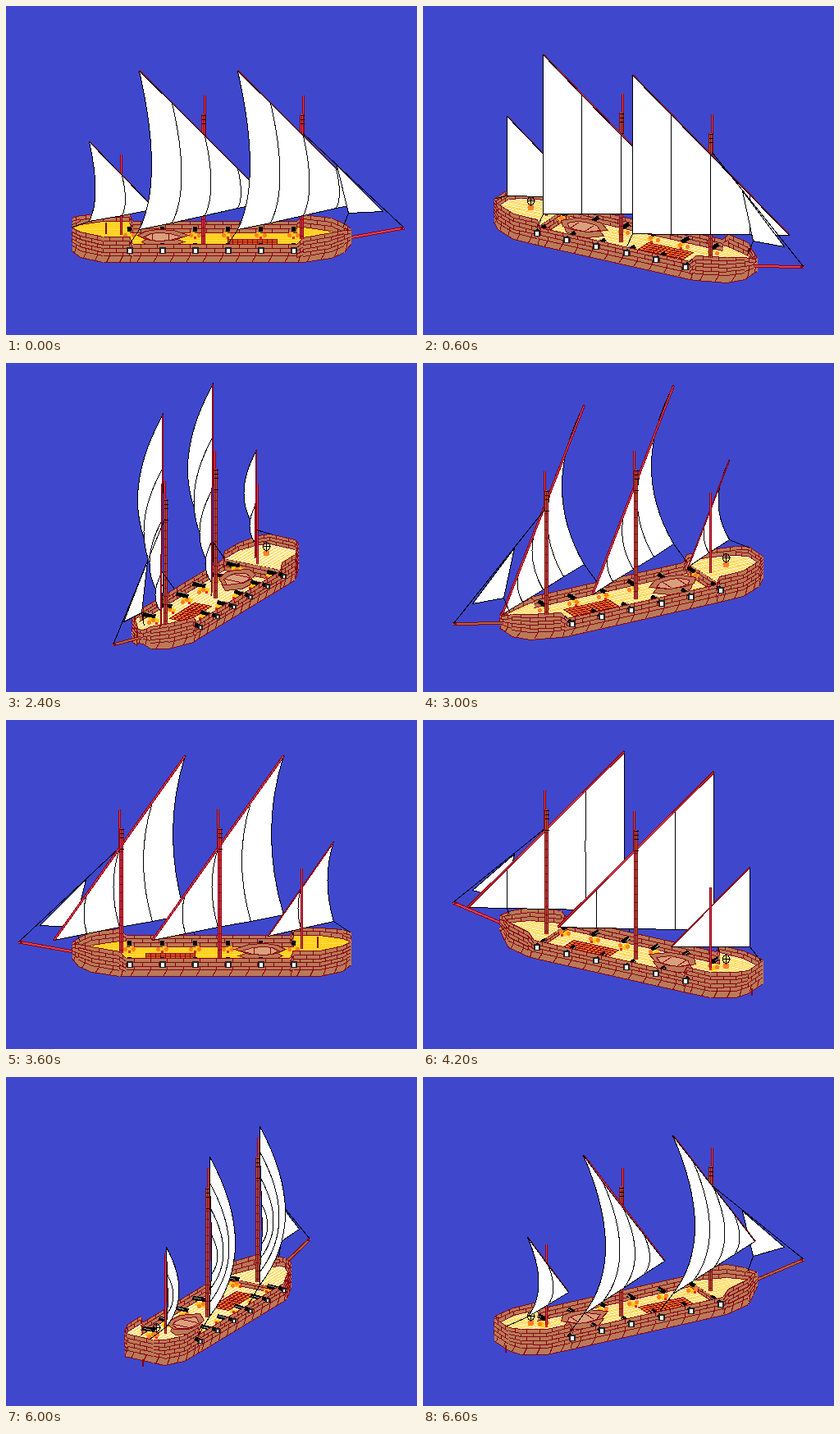
An HTML page that plays this animation: 501x401 px, repeating every 7.2 s.

```html
<!DOCTYPE html>
<html lang="en">
<head>
<meta charset="utf-8">
<title>Turning ship</title>
<style>
html, body { margin: 0; width: 100%; height: 100%; overflow: hidden; background: #3f48cc; }
svg { display: block; width: 501px; height: 401px; }
</style>
</head>
<body>
<svg id="stage" viewBox="0 0 501 401" shape-rendering="crispEdges"></svg>
<script>
const stage = document.getElementById('stage');
const STEP = 600, VIEWS = 12;
const DARK = '#880015', WOOD = '#b97a57', RED = '#e0404c', TAN = '#ad6440', GOLD = '#ffc90e', ORANGE = '#ff7f27';

// Ship space: p runs to the bow, q to starboard, z is the height as a screen row.
// Projection weights for views 0, 30, 60 and 90 degrees off the beam.
const PX = [1, .909, .51, 0], QX = [0, .5, .866, 1];
const PY = [0, .205, .31, .41], QY = [.36, .33, .18, 0];

let view, cs, sn, weights, out;

function setView(k) {
  view = k;
  const half = k % 6, m = half > 3 ? 6 - half : half;
  cs = k < 3 || k > 9 ? 1 : k === 3 || k === 9 ? 0 : -1;
  sn = k % 6 === 0 ? 0 : k < 6 ? 1 : -1;
  weights = [cs * PX[m], -sn * QX[m], sn * PY[m], cs * QY[m]];
}

function proj([p, q, z]) {
  const [a, b, c, d] = weights;
  return [Math.round(250 + a * p + b * q) + .5, Math.round(z + c * p + d * q) + .5];
}

const at = v => proj(v).join(' ');
const mix = (a, b, t) => a.map((v, i) => v + (b[i] - v) * t);
const trace = pts => 'M' + pts.map(at).join('L');

function path(d, fill, stroke, width = 1) {
  out.push(`<path d="${d}" fill="${fill || 'none'}" stroke="${stroke || 'none'}" stroke-width="${width}"/>`);
}
const poly = (pts, fill, stroke) => path(trace(pts) + 'Z', fill, stroke);
const line = (a, b, color, width) => path(trace([a, b]), null, color, width);

function dot(v, r, color) {
  const [x, y] = proj(v);
  out.push(`<circle cx="${x}" cy="${y}" r="${r}" fill="${color}"/>`);
}

// p, q, rail height, keel height
const side = [
  [-170, 18, 264, 292], [-160, 28, 265, 296], [-132, 40, 267, 298], [-100, 40, 267, 298],
  [-96, 40, 276, 298], [104, 40, 276, 298], [112, 40, 268, 298], [146, 26, 267, 298],
  [162, 10, 269, 296], [170, 4, 272, 289]
];
const hull = [...side, ...side.map(([p, q, r, k]) => [p, -q, r, k]).reverse()];
const deckAt = p => p <= -100 ? 276 : p >= 104 ? 283 : 290;

function planks(a, b, floorA, floorB, outer) {
  const low = t => floorA + (floorB - floorA) * t;
  const spot = (t, f) => {
    const v = mix(a, b, t);
    return [v[0], v[1], v[2] + (low(t) - v[2]) * f];
  };
  poly([spot(0, 0), spot(1, 0), spot(1, 1), spot(0, 1)], WOOD);
  const height = (floorA + floorB - a[2] - b[2]) / 2;
  const band = outer ? height - 8 : height;
  const rows = Math.max(1, Math.round(band / 4.6));
  const cols = Math.max(1, Math.round(Math.hypot(b[0] - a[0], b[1] - a[1]) / 20));
  let d = trace([spot(0, 0), spot(1, 0)]) + trace([spot(0, 1), spot(1, 1)]);
  for (let r = 1; r <= rows; r++) {
    const f0 = (r - 1) / rows * band / height, f1 = r / rows * band / height;
    d += trace([spot(0, f1), spot(1, f1)]);
    for (let c = 0; c < cols; c++) {
      const t = (c + (r % 2 ? .5 : 0)) / cols;
      d += trace([spot(t, f0), spot(t, f1)]);
    }
  }
  if (outer) for (let c = 0; c < cols; c++) {
    d += trace([spot((c + .5) / cols, band / height), spot((c + .25) / cols, 1)]);
  }
  path(d, null, DARK);
}

function walls(front) {
  hull.forEach((a, i) => {
    const b = hull[(i + 1) % hull.length];
    const dx = proj(b)[0] - proj(a)[0];
    if (front ? dx <= 0 : dx >= 0) return;
    const mid = deckAt((a[0] + b[0]) / 2);
    planks(a, b, front ? a[3] : mid, front ? b[3] : mid, front);
  });
}

function deck(from, to, z) {
  const flat = hull.filter(v => v[0] >= from && v[0] <= to).map(([p, q]) => [p, q, z]);
  const beam = view % 6 === 0;
  poly(flat, beam ? GOLD : '#fff4c8');
  let d = '';
  for (let q = -35; q <= 35; q += 5) {
    const inset = 40 - Math.abs(q);
    const p0 = Math.max(from, -168, -134 - inset * 1.5), p1 = Math.min(to, 164, 112 + inset * 2.2);
    d += trace([[p0, q, z], [p1, q, z]]);
  }
  path(d, null, beam ? '#ffdc3c' : '#ffd23c');
}

function decks() {
  deck(-132, 112, 290);
  if (sn > 0) planks([-100, 40, 276], [-100, -40, 276], 290, 290);
  deck(-170, -100, 276);
  if (sn < 0) planks([104, 40, 283], [104, -40, 283], 290, 290);
  deck(104, 170, 283);
}

function hatch() {
  poly([[20, -12, 288], [80, -12, 288], [80, 12, 288], [20, 12, 288]], ORANGE, DARK);
  let d = '';
  for (let p = 26; p < 80; p += 6) d += trace([[p, -12, 288], [p, 12, 288]]);
  for (let q = -6; q < 12; q += 6) d += trace([[20, q, 288], [80, q, 288]]);
  path(d, null, DARK);
}

function boat() {
  const ring = (s, z) => [[-90, 0], [-80, 15], [-66, 19], [-46, 17], [-28, 0], [-46, -17], [-66, -19], [-80, -15]]
    .map(([p, q]) => [-60 + (p + 60) * s, q * s, z]);
  poly(ring(.85, 287), WOOD, DARK);
  poly(ring(1, 279), WOOD, DARK);
  poly(ring(.72, 281), '#d9a07c', DARK);
  for (const p of [-72, -52]) line([p, -11, 281], [p, 11, 281], DARK);
}

function wheel() {
  const [x, y] = proj([-131, 0, 264]);
  if (!sn) return line([-129, 0, 263], [-129, 0, 277], DARK, 2);
  dot([-131, 0, 272], 4, ORANGE);
  out.push(`<ellipse cx="${x}" cy="${y}" rx="4" ry="5" fill="none" stroke="#000"/>`);
  path(`M${x - 5} ${y}h10M${x} ${y - 6}v12`, null, '#000');
}

function gun(p, s) {
  line([p - 3, s * 17, 287], [p - 3, s * 32, 287], GOLD, 5);
  dot([p - 5, s * 26, 288], 2.5, ORANGE);
  dot([p + 5, s * 26, 288], 2.5, ORANGE);
  dot([p, s * 19, 289], 1.5, '#ed1c24');
  line([p, s * 20, 281], [p, s * 38, 282], '#000', 5);
  line([p - 3, s * 24, 280], [p - 3, s * 34, 280], '#999');
}

function muzzle(p, s) {
  line([p, s * 36, 281], [p, s * 43, 282], '#000', 5);
  if (!cs) return;
  const [x, y] = proj([p, s * 43, 282]);
  const r = Math.abs(weights[3]) > .2 ? 2 : 1;
  path(`M${x - r - 2} ${y - r - 2}h${2 * r + 4}v${2 * r + 4}h${-2 * r - 4}z`, '#222');
  path(`M${x - r} ${y - r}h${2 * r}v${2 * r + 1}h${-2 * r}z`, '#fff');
}

function guns(draw, s) {
  for (let i = 0; i < 6; i++) draw(-100 + 40 * i, s);
}

function spar(a, b, width, fill) {
  line(a, b, DARK, width);
  line(a, b, fill, width - 2);
}

function mast(m) {
  const p = m.p, lower = view % 3 ? TAN : RED;
  if (m.size < 1) return spar([p, 0, 180], [p, 0, m.foot], 3, RED);
  spar([p + 2, 0, 108], [p + 2, 0, 156], 3, RED);
  spar([p, 0, 131], [p, 0, m.foot], 5, lower);
  const [x, y] = proj([p, 0, 160]);
  let d = `M${x} ${y - 28}V${proj([p, 0, m.foot])[1]}`;
  for (let i = 0; i < (m.foot - 160) / 10; i++) d += `M${x - 2} ${y + i * 10}h4`;
  path(d, null, DARK);
  path(`M${x - 2} ${y - 27}h5m-5 5h5m-5 5h5m-5 14h5`, null, '#000');
}

function sail(m) {
  const { top, tack, clew, size } = m, n = size < 1 ? 2 : 4;
  const seam = s => {
    const a = mix(top, tack, s), b = mix(clew, tack, s), c = mix(a, b, .5), k = 2 * size * (1 - s);
    return [a, [c[0] + 15 * k, c[1] + 27 * k, c[2] + 8 * k], b];
  };
  const order = [...Array(n).keys()];
  if (sn < 0) order.reverse();
  for (const i of order) {
    const [a, b, c] = seam(i / n), [d, e, f] = seam((i + 1) / n);
    path(`M${at(a)}Q${at(b)} ${at(c)}L${at(f)}Q${at(e)} ${at(d)}Z`, '#fff', '#000');
  }
}

function rig(m) {
  const yard = () => {
    const steep = Math.abs(proj(m.top)[0] - proj(m.tack)[0]) < 10;
    spar(m.top, m.tack, m.size < 1 || steep ? 2 : 3, view % 6 === 4 ? TAN : RED);
    dot(m.top, 1, '#000');
  };
  const parts = [() => mast(m), yard, () => sail(m)];
  if (cs < 0) parts.reverse();
  parts.forEach(f => f());
  line(m.clew, m.sheet, '#000');
}

function jib() {
  const head = [112, 0, 155], tip = [235, 0, 270], clew = [167, 0, 252];
  line(head, tip, '#000');
  poly([[153, 0, 194], [209, 0, 250], clew], '#fff', '#000');
  line(clew, [160, 0, 270], '#000');
}

function bowsprit() {
  spar([168, 0, 282], [235, 0, 270], 4, view % 6 > 3 ? TAN : RED);
  dot([232, 0, 270], 1.5, DARK);
}

function makeRig(p, size, foot, high, low, foreLow, sheet) {
  return {
    p, size, foot, sheet, draw: rig,
    top: [p - 78 * size, 49 * size, high],
    clew: [p - 78 * size, 49 * size, low],
    tack: [p + 82 * size, -42 * size, foreLow]
  };
}
const rigs = [
  makeRig(-110, .5, 278, 156.5, 253.5, 255, [-170, 14, 264]),
  makeRig(-10, 1, 289, 61, 254.5, 253, [-100, 40, 276]),
  makeRig(110, 1, 283, 61, 254.5, 253, [20, 40, 276]),
  { p: 200, draw: jib }
];

function drawShip(k) {
  setView(k);
  out = ['<rect width="501" height="401" fill="#3f48cc"/>'];
  if (sn <= 0) bowsprit();
  decks();
  walls(false);
  const near = cs || 1;
  guns(gun, -near);
  hatch();
  boat();
  wheel();
  guns(gun, near);
  walls(true);
  guns(muzzle, near);
  if (!cs) guns(muzzle, -near);
  if (sn < 0) line([-165, 0, 292], [-165, 0, 301], DARK, 2);
  if (sn > 0) bowsprit();
  const dir = sn || cs;
  [...rigs].sort((a, b) => dir * (a.p - b.p)).forEach(m => m.draw(m));
  stage.innerHTML = out.join('');
}

let shown = -1;
function tick() {
  const k = Math.floor(performance.now() / STEP) % VIEWS;
  if (k !== shown) drawShip(shown = k);
  requestAnimationFrame(tick);
}
tick();
</script>
</body>
</html>
```
